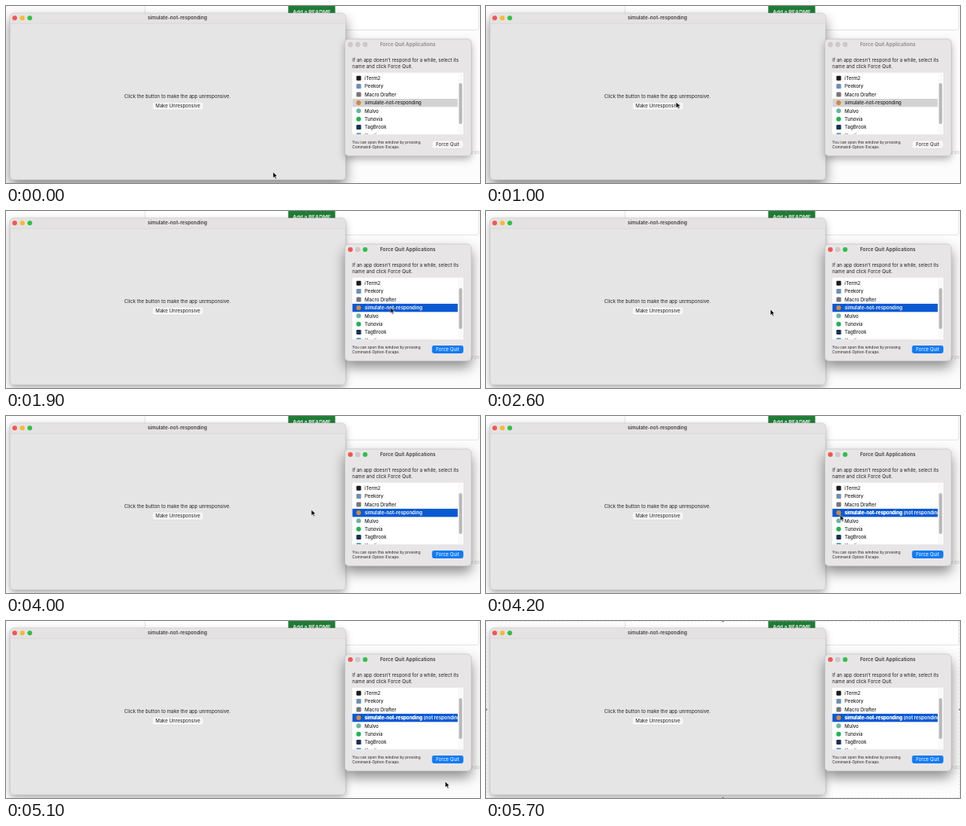
Recreate the animation shown at these times as an HTML page. Size 600 by 225 pixels, loop 5.8 s.

```html
<!DOCTYPE html>
<html lang="en">
<head>
<meta charset="utf-8">
<title>Force quit demo</title>
<style>
  html, body { margin: 0; width: 100%; height: 100%; overflow: hidden; background: #fdfcfd; }
  svg { display: block; width: 100%; height: 100%; }
  text { font: 6.05px Inter, "Open Sans", sans-serif; fill: #222; white-space: pre; }
  .bold { font-weight: 600; font-size: 6.25px; }
  .mid { text-anchor: middle; }
  .small { font-size: 4.75px; }
  .list text { font-weight: 500; }
  .white { fill: #fff; }
  .list text.white { fill: #fff; font-weight: 600; }
  .button { fill: #f8f7f8; stroke: #d3d1d3; stroke-width: .4; }
  .dim { fill: #cdc9cc; stroke: #bab7b9; stroke-width: .4; }

  .idle, .active, .hung, .marquee, #pointer { animation: 5.8s infinite step-end; }
  .idle { animation-name: idle; }
  .active { animation-name: active; }
  .hung { animation-name: hung; }
  .marquee { animation-name: marquee; }
  #pointer { animation-name: move; }

  /* Percentages are time / 5800 ms */
  @keyframes idle { 0% { opacity: 1 } 32.7586%, 100% { opacity: 0 } }
  @keyframes active { 0% { opacity: 0 } 32.7586%, 100% { opacity: 1 } }
  @keyframes hung { 0% { opacity: 0 } 72.4137%, 100% { opacity: 1 } }
  @keyframes marquee { 0% { opacity: 0 } 96.5516%, 100% { opacity: 1 } }
  @keyframes move {
    0% { transform: translate(338px, 211px); animation-timing-function: steps(6) }
    10.3448% { transform: translate(280px, 150px); animation-timing-function: steps(4) }
    17.2413%, 20.6896% { transform: translate(240.5px, 122px); animation-timing-function: steps(3) }
    25.862%, 27.5862% { transform: translate(430px, 131px) }
    29.3103%, 32.7586% { transform: translate(486.5px, 122.5px); animation-timing-function: steps(3) }
    37.931% { transform: translate(466px, 123px); animation-timing-function: steps(4) }
    44.8275%, 67.2413% { transform: translate(360px, 125px) }
    68.9655% { transform: translate(386.5px, 119px); animation-timing-function: steps(5) }
    77.5862% { transform: translate(541px, 135.5px); animation-timing-function: steps(6) }
    87.931% { transform: translate(556px, 204px); animation-timing-function: steps(3) }
    93.1034%, 100% { transform: translate(562px, 240px) }
  }
</style>
</head>
<body>
<svg viewBox="0 0 600 225" preserveAspectRatio="none">
  <defs>
    <filter id="deep" x="-30%" y="-30%" width="160%" height="170%">
      <feDropShadow dx="0" dy="8" stdDeviation="8" flood-opacity=".45"/>
    </filter>
    <filter id="soft" x="-30%" y="-30%" width="160%" height="170%">
      <feDropShadow dx="0" dy="4" stdDeviation="5" flood-opacity=".3"/>
    </filter>
    <clipPath id="listClip"><rect x="438.5" y="85" width="133" height="78"/></clipPath>
    <rect id="mainFrame" x="5" y="9" width="425" height="212" rx="5" fill="#e6e5e6"/>
    <rect id="quitFrame" x="429" y="42" width="160" height="148.5" rx="5" fill="#e8e5e7"/>
  </defs>

  <!-- Page behind the windows -->
  <rect width="600" height="225" fill="#fdfcfd"/>
  <path d="M176 0V30.5H596Q598.5 30.5 598.5 28V0" fill="#fff" stroke="#dcdcde" stroke-width=".8"/>
  <rect x="357.3" y="-4" width="59.4" height="17" rx="2.5" fill="#1f7d35"/>
  <text class="mid white" x="387" y="10" style="font-size:6.6px;font-weight:600">Add a README</text>
  <text x="587" y="187.5" style="font-size:5.5px;fill:#c4c4c8">ly popular</text>

  <!-- Main window -->
  <g>
    <use class="idle" href="#mainFrame" filter="url(#deep)"/>
    <use class="active" href="#mainFrame" filter="url(#soft)"/>
    <use href="#mainFrame" stroke="#b3b1b3" stroke-width=".5"/>
    <path d="M5.4 22V14Q5.4 9.4 10 9.4H425Q429.6 9.4 429.6 14V22Z" fill="#e5e2e4"/>
    <path d="M5.4 22.2H429.6" stroke="#d3d1d2" stroke-width=".6"/>
    <circle cx="11" cy="15.3" r="3" fill="#f0584f"/>
    <circle cx="20.6" cy="15.3" r="3" fill="#f3bb30"/>
    <circle cx="30.1" cy="15.3" r="3" fill="#31c145"/>
    <text class="bold mid" x="217" y="17.4" style="fill:#404040">simulate-not-responding</text>
    <text class="mid" x="217.1" y="117.3">Click the button to make the app unresponsive.</text>
    <rect class="button" x="185.3" y="122.3" width="64.5" height="9.8" rx="2.4"/>
    <text class="mid" x="217.5" y="129.4">Make Unresponsive</text>
  </g>

  <!-- Force quit window -->
  <g>
    <use class="idle" href="#quitFrame" filter="url(#soft)"/>
    <use class="active" href="#quitFrame" filter="url(#deep)"/>
    <use href="#quitFrame" stroke="#b3b1b3" stroke-width=".5"/>
    <g class="idle">
      <circle class="dim" cx="435.9" cy="49" r="2.9"/>
      <circle class="dim" cx="454.6" cy="49" r="2.9"/>
      <text class="bold mid" x="508.6" y="51.2" style="fill:#8a888a">Force Quit Applications</text>
    </g>
    <g class="active">
      <circle cx="435.9" cy="49" r="3" fill="#f0584f"/>
      <circle cx="454.6" cy="49" r="3" fill="#31c145"/>
      <text class="bold mid" x="508.6" y="51.2" style="fill:#404040">Force Quit Applications</text>
    </g>
    <circle class="dim" cx="445.3" cy="49" r="2.9"/>
    <text x="438.3" y="71.4" style="font-size:6.1px">If an app doesn't respond for a while, select its</text>
    <text x="438.3" y="79.2" style="font-size:6.1px">name and click Force Quit.</text>

    <rect x="438.3" y="84.8" width="140.7" height="78.4" fill="#fff"/>
    <rect x="572" y="84.8" width="7" height="78.4" fill="#fafafa"/>
    <rect x="573.4" y="98" width="4" height="52" rx="2" fill="#b9b8b9"/>
    <g class="list" clip-path="url(#listClip)">
      <rect class="idle" x="438.5" y="117.9" width="133.3" height="10.4" fill="#d4d3d4"/>
      <rect class="active" x="438.5" y="117.9" width="133.3" height="10.4" fill="#0b59d2"/>
      <g id="rows"></g>
      <text class="idle" x="454" y="125.2">simulate-not-responding</text>
      <text class="active white" x="454" y="125.2">simulate-not-responding</text>
      <text class="hung white" x="454" y="125.2">simulate-not-responding (not responding)</text>
    </g>

    <text class="small" x="438.3" y="175.3">You can open this window by pressing</text>
    <text class="small" x="438.3" y="181.4">Command-Option-Escape.</text>
    <g class="idle">
      <rect class="button" x="539.3" y="171" width="39.6" height="10" rx="2.4"/>
      <text class="mid" x="559" y="178.1">Force Quit</text>
    </g>
    <g class="active">
      <rect x="539.3" y="171" width="39.6" height="10" rx="2.4" fill="#0f7bf5"/>
      <text class="mid white" x="559" y="178.1">Force Quit</text>
    </g>
  </g>

  <!-- Screen selection outline -->
  <g class="marquee">
    <rect x=".2" y=".2" width="599.6" height="224.6" fill="none" stroke="#bbb" stroke-width=".5" stroke-dasharray="2.4 2.4"/>
    <g fill="#8c8c8c">
      <circle cx="300" cy="0" r="1.6"/><circle cx="300" cy="225" r="1.6"/>
      <circle cx="0" cy="112.5" r="1.6"/><circle cx="600" cy="112.5" r="1.6"/>
    </g>
  </g>

  <g id="pointer">
    <path d="M0 0V7.6L1.8 6L3 8.8L4.4 8.2L3.2 5.5H5.5Z" fill="#000" stroke="#fff" stroke-width=".6" stroke-linejoin="round"/>
  </g>
</svg>
<script>
  const rows = [
    ["iTerm2", "#1c1c1e", "square"],
    ["Peekory", "#6f8fb5", "square"],
    ["Macro Drafter", "#77777a", "square"],
    ["", "#d08a3a", "circle"],
    ["Mulvo", "#6bb5a2", "circle"],
    ["Tunovia", "#1fb455", "circle"],
    ["TagBrook", "#17324f", "square"],
    ["Xurdi", "#3f82c8", "square"],
  ];
  const addNode = (tag, attrs) => {
    const node = document.createElementNS("http://www.w3.org/2000/svg", tag);
    for (const key in attrs) node.setAttribute(key, attrs[key]);
    return document.getElementById("rows").appendChild(node);
  };
  rows.forEach(([name, fill, shape], i) => {
    const y = 91.7 + i * 10.4;
    if (shape === "circle") addNode("circle", { cx: 446.4, cy: y, r: 3, fill });
    else addNode("rect", { x: 443.5, y: y - 3, width: 6, height: 6, rx: 1.2, fill });
    addNode("text", { x: 454, y: y + 2.2 }).textContent = name;
  });
</script>
</body>
</html>
```
